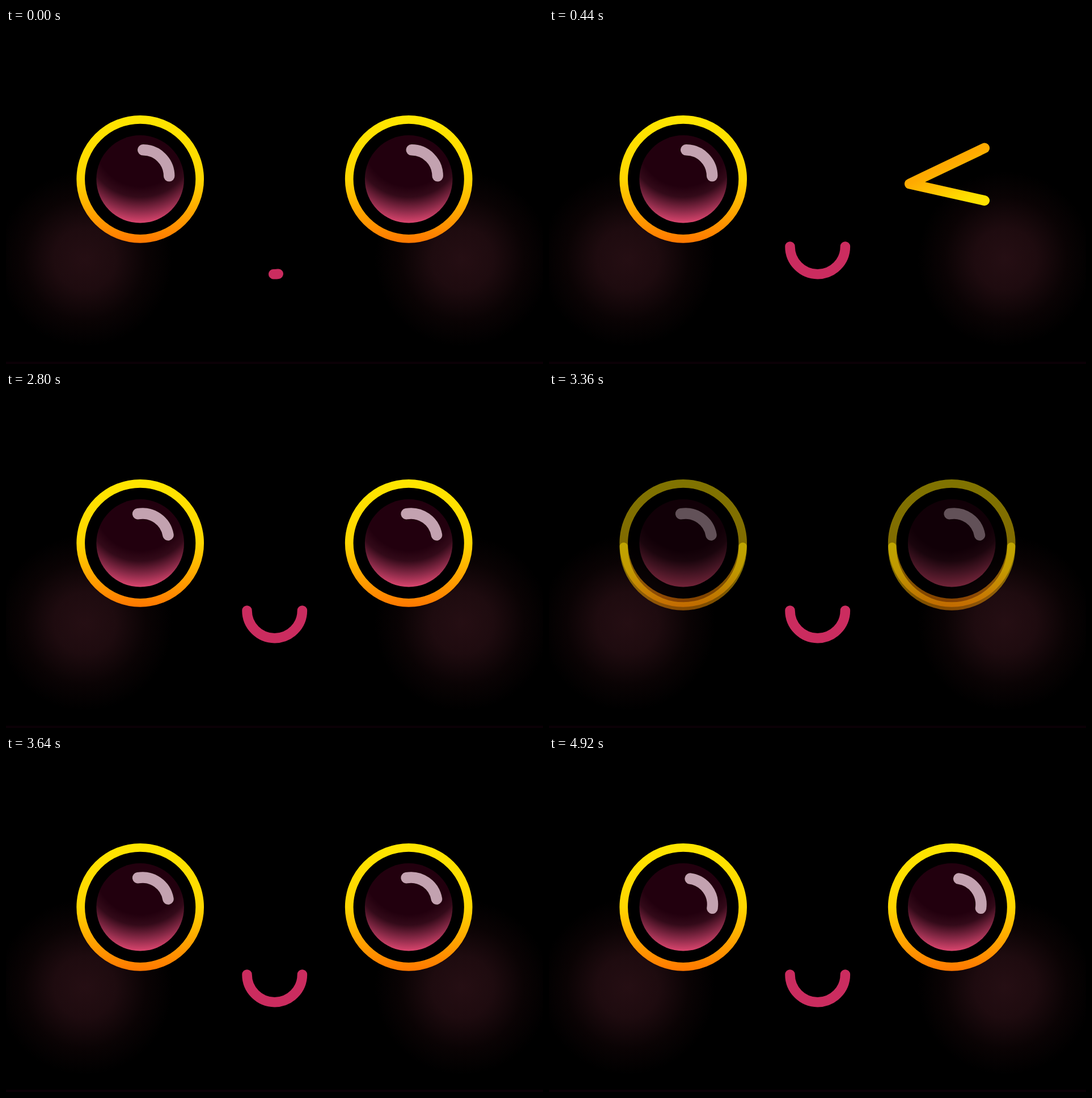
Recreate the animation shown at these times as an HTML page. Size 947x592 px, loop 5000 ms.

```html
<!DOCTYPE html>
<html lang="en">
<head>
<meta charset="utf-8">
<title>Blinking face</title>
<style>
  html, body { margin: 0; width: 100%; height: 100%; overflow: hidden; background: #000; }
  svg { display: block; width: 100vw; height: 100vh; }
  .line { fill: none; stroke-linecap: round; stroke-linejoin: round; }
</style>
</head>
<body>
<svg viewBox="0 0 947 592">
  <defs>
    <linearGradient id="ring" gradientUnits="userSpaceOnUse" x1="0" y1="-112" x2="0" y2="112">
      <stop offset="0" stop-color="#ffe600"/>
      <stop offset=".5" stop-color="#ffd600"/>
      <stop offset="1" stop-color="#ff7800"/>
    </linearGradient>
    <linearGradient id="lid" gradientUnits="userSpaceOnUse" x1="0" y1="0" x2="0" y2="119">
      <stop offset="0" stop-color="#ffe000"/>
      <stop offset=".4" stop-color="#ffda00"/>
      <stop offset="1" stop-color="#ff9000"/>
    </linearGradient>
    <linearGradient id="winkFill" gradientUnits="userSpaceOnUse" x1="636" y1="274" x2="666" y2="337">
      <stop offset="0" stop-color="#ffaa00"/>
      <stop offset="1" stop-color="#ffe200"/>
    </linearGradient>
    <radialGradient id="iris" gradientUnits="userSpaceOnUse" cx="0" cy="-66" r="143.5">
      <stop offset="0" stop-color="#22000e"/>
      <stop offset=".55" stop-color="#22000e"/>
      <stop offset=".68" stop-color="#330a19"/>
      <stop offset=".85" stop-color="#8a2a48"/>
      <stop offset="1" stop-color="#dc466f"/>
    </radialGradient>
    <radialGradient id="blush">
      <stop offset="0" stop-color="#250e13"/>
      <stop offset=".35" stop-color="#1e0b0f"/>
      <stop offset=".7" stop-color="#0a0304"/>
      <stop offset="1" stop-color="#000"/>
    </radialGradient>
    <g id="openEye">
      <circle r="105" stroke="url(#ring)" stroke-width="14.7"/>
      <circle r="77.3" fill="url(#iris)"/>
      <path class="line glint" d="M5-51.5A46 46 0 0 1 51-5.5" stroke="#c3a2b0" stroke-width="19.5"/>
    </g>
    <path id="closedEye" class="line" d="M-105 6.2A105 105 0 0 0 105 6.2" stroke="url(#lid)" stroke-width="14.5"/>
  </defs>
  <rect width="947" height="592"/>
  <rect y="588" width="947" height="4" fill="#0b0006"/>
  <circle cx="139" cy="407" r="155" fill="url(#blush)"/>
  <circle cx="805" cy="407" r="155" fill="url(#blush)"/>
  <g transform="translate(236.7 266.3)">
    <use id="leftOpen" href="#openEye"/>
    <use id="leftClosed" href="#closedEye"/>
  </g>
  <g transform="translate(710.2 266.3)">
    <use id="rightOpen" href="#openEye"/>
    <use id="rightClosed" href="#closedEye"/>
  </g>
  <path id="wink" class="line" d="M768 211.5L636 274.5L768 304" stroke="url(#winkFill)" stroke-width="18"/>
  <path id="mouth" class="line" stroke="#cb2c5f" stroke-width="17.5"/>
</svg>
<script>
const LOOP = 5000, STEP = 40;
const byId = id => document.getElementById(id);
const glint = document.querySelector('.glint');
const mix = (a, b, p) => a + (b - a) * p;

// Eased progress of t between two moments
function ease(t, from, to) {
  const p = Math.min(1, Math.max(0, (t - from) / (to - from)));
  return p * p * (3 - 2 * p);
}

// How far the lids are shut in a blink that lasts 320 ms
function blink(t, start) {
  const fade = Math.min(t - start, start + 320 - t) / 80;
  return Math.min(1, Math.max(0, fade));
}

function mouthPath(p) {
  const point = degrees => {
    const a = degrees * Math.PI / 180;
    return `${473.7 + 48.7 * Math.sin(a)} ${385 + 48.7 * Math.cos(a)}`;
  };
  return `M${point(mix(-2.4, -90, p))}A48.7 48.7 0 0 0 ${point(mix(7.8, 90, p))}`;
}

function draw(t) {
  const shut = Math.max(blink(t, 0), blink(t, 3320));
  const winking = t >= 320 && t < 2800;
  const show = (id, opacity) => byId(id).setAttribute('opacity', opacity);
  show('leftOpen', 1 - shut);
  show('leftClosed', shut);
  show('rightOpen', winking ? 0 : 1 - shut);
  show('rightClosed', winking ? 0 : shut);
  show('wink', winking ? 1 : 0);

  const angle = -10 * ease(t, 1400, 1640) + 18.4 * ease(t, 4640, 4920);
  glint.setAttribute('transform', `rotate(${angle})`);

  const smile = ease(t, 0, 440);
  const dip = 5.5 * Math.sin(Math.PI * smile);
  byId('mouth').setAttribute('d', mouthPath(smile));
  byId('mouth').setAttribute('transform', `translate(0 ${dip})`);
}

let start;
function tick(now) {
  start ??= now;
  draw(Math.floor((now - start) % LOOP / STEP) * STEP);
  requestAnimationFrame(tick);
}
draw(0);
requestAnimationFrame(tick);
</script>
</body>
</html>
```
